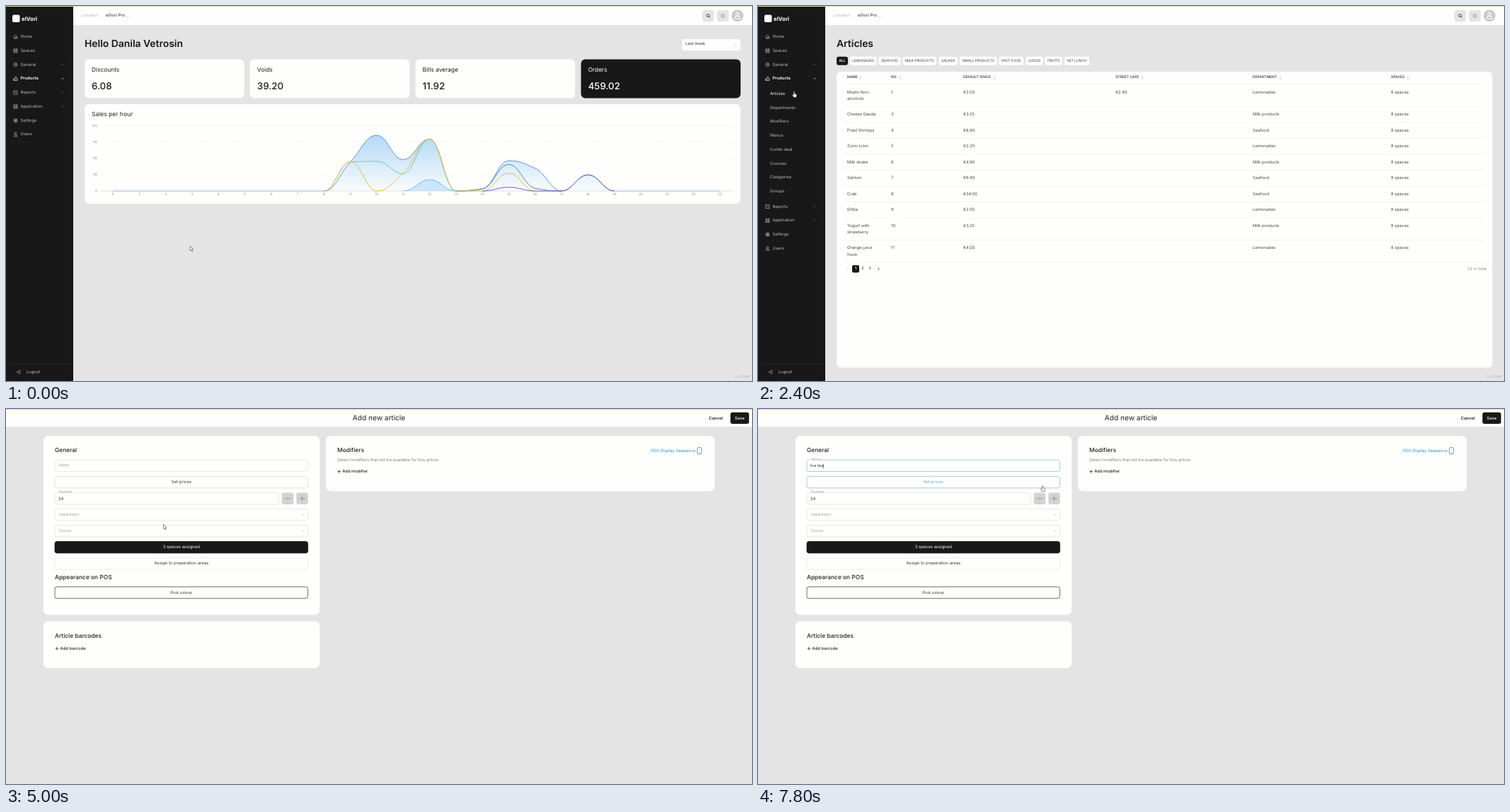
An HTML page that plays this animation: 1054 by 531 pixels, repeating every 8000 ms.

```html
<!DOCTYPE html>
<html lang="en">
<head>
<meta charset="utf-8">
<title>Back office</title>
<style>
  html, body { margin: 0; width: 100%; height: 100%; overflow: hidden; background: #e4e4e4; }
  svg { display: block; }
  #stage { width: 100vw; height: 100vh; }
  text { font-family: Inter, sans-serif; dominant-baseline: central; text-rendering: geometricPrecision; white-space: pre; }
</style>
</head>
<body>
<svg id="stage" viewBox="0 0 1054 531"></svg>
<script>
const INK = '#181818', PAPER = '#fefefd', GREY = '#999', BLUE = '#2f8acb', FOCUS = '#5aaed8';
const LOOP = 8000, STEP = 200;

// Drawing helpers
const text = (x, y, str, size = 5.9, fill = '#333', weight = 400, anchor = 'start') =>
  `<text x="${x}" y="${y}" font-size="${size}" fill="${fill}" font-weight="${weight}" text-anchor="${anchor}">${str}</text>`;
const mid = (x, y, str, size, fill, weight) => text(x, y, str, size, fill, weight, 'middle');
const rect = (x, y, w, h, fill = PAPER, r = 0, stroke = 'none') =>
  `<rect x="${x}" y="${y}" width="${w}" height="${h}" rx="${r}" fill="${fill}" stroke="${stroke}" stroke-width=".8"/>`;
const line = (d, stroke, width = .7, extra = '') =>
  `<path d="${d}" fill="none" stroke="${stroke}" stroke-width="${width}" ${extra}/>`;
const at = (x, y, content) => `<g transform="translate(${x} ${y})">${content}</g>`;
const chevron = (x, y, color, dir = 1) => line(`M${x - 1.6} ${y - .8 * dir}l1.6 ${1.6 * dir} 1.6 ${-1.6 * dir}`, color, .6);
const plus = (x, y, s, color, w = .7) => line(`M${x - s} ${y}h${2 * s}M${x} ${y - s}v${2 * s}`, color, w);
const device = (x, y, color) => rect(x, y, 6, 9, 'none', 1, color) + line(`M${x + 2} ${y + 7.6}h2`, color, .5);
const lens = (x, y, color, w = .7) => line(`M${x + 1.7} ${y - .4}a2 2 0 1 1-4 0a2 2 0 1 1 4 0M${x + 1.1} ${y + 1.1}l1.6 1.6`, color, w);
const person = 'M-1.4-1.6a1.4 1.4 0 1 1 2.8 0a1.4 1.4 0 1 1-2.8 0M-2.3 2.7v-.7q0-1.6 2.3-1.6t2.3 1.6v.7z';

// Sidebar
const gridIcon = 'M-2.6-2.6h2v2h-2zM.6-2.6h2v2h-2zM-2.6.6h2v2h-2zM.6.6h2v2h-2z';
const ring = 'M-2.6 0a2.6 2.6 0 1 1 5.2 0a2.6 2.6 0 1 1-5.2 0M-1 0a1 1 0 1 1 2 0a1 1 0 1 1-2 0';
const menu = [
  ['Home', 'M-2.7 0L0-2.5 2.7 0M-2-.5v3h4v-3M-.5 2.5v-1.6h1v1.6'],
  ['Spaces', 'M-2.7-2.5h2.3v2h-2.3zM.8-2.5h1.9v2h-1.9zM-2.7.6h1.9v2h-1.9zM.4.6h2.3v2H.4z'],
  ['General', ring, 1],
  ['Products', 'M-1.6-1L.6-2.6 2.4-.8v3.4h-4zM-2.8.2v2.4h1.2M-.6.2h2', 1],
  ['Reports', 'M-2.6-2.5h5.2v5h-5.2zM-1.5.3l1-1 1 1 1.2-1', 1],
  ['Application', gridIcon, 1],
  ['Settings', ring + 'M-2-2L2 2M2-2L-2 2'],
  ['Users', person],
];
const submenu = ['Articles', 'Departments', 'Modifiers', 'Menus', 'Combi deal', 'Courses', 'Categories', 'Groups'];

function sidebar(t) {
  const open = Math.min(1, Math.max(0, (t - 1200) / 400)), height = 161.4 * open;
  let out = rect(0, 1, 95, 530, INK) + rect(9, 12.5, 10.5, 10.5, '#fff', 2) + text(22, 18, 'elVori', 7.8, '#fff', 700);
  menu.forEach(([label, icon, expands], i) => {
    const y = 43.5 + 19.78 * i + (i > 3 ? height : 0), active = label === 'Products';
    const color = active ? '#fff' : '#bdbdbd';
    out += at(13.5, y, line(icon, color, .65)) + text(20.5, y, label, 5.9, color, active ? 600 : 400);
    if (expands) out += chevron(80, y - .2, active ? '#fff' : '#777', active && open ? -1 : 1);
  });
  const items = submenu.map((label, i) =>
    text(17, 11.3 + 19.75 * i, label, 5.9, !i && t >= 1800 && t <= 2600 ? '#fff' : '#bdbdbd')).join('');
  if (open) out += `<svg x="0" y="113" width="95" height="${height}">${items}</svg>`;
  return out + line('M5 507h85', '#2b2b2b', .7) + text(28.7, 518.5, 'Logout', 5.8, '#c4c4c4') +
    at(18, 518.5, line('M-.6-2.3h2.6v4.6H-.6M-2.8 0H.6M-1.6-1.2L-2.8 0l1.2 1.2', '#bbb', .6));
}

function topBar() {
  return rect(95, 0, 959, 27) + text(107, 13.7, 'Location:', 5.7, '#b4b4b4') + text(141, 13.7, 'elVori Pro', 5.9, '#222') +
    chevron(171.7, 15.5, '#aaa') +
    rect(984, 5.8, 16.3, 16.3, '#e4e4e4', 3) + lens(992.3, 14, '#222', .8) +
    rect(1004.6, 5.8, 16.3, 16.3, '#e4e4e4', 3) +
    at(1012.8, 14, line('M-2.7 0a2.7 2.7 0 1 1 5.4 0a2.7 2.7 0 1 1-5.4 0M-1.2 0a1.2 2.7 0 1 1 2.4 0a1.2 2.7 0 1 1-2.4 0M-2.7 0h5.4', '#999', .5)) +
    `<circle cx="1033.5" cy="13.9" r="8.4" fill="#c9c9cb"/>` +
    at(1033.5, 13.7, `<g transform="scale(1.6)">${line(person, '#fff', .65)}</g>`) +
    text(1050, 524.7, 'v. 0.3.84', 4.95, '#a5a5a5', 400, 'end');
}

// Dashboard chart: values by hour, every hour not listed is zero
const series = [
  ['#5f93dc', { 9: 54, 10: 103, 11: 58, 12: 96, 14: 4, 15: 56, 16: 42, 18: 30 }],
  ['#5b7fa8', { 14: 4, 15: 49, 16: 5 }],
  ['#62cdbd', { 9: 54, 10: 55, 11: 32, 12: 96 }],
  ['#e6bc3c', { 9: 54, 11: 33, 12: 96, 15: 33 }],
  ['#6c5fc4', { 15: 7, 18: 30 }],
  ['#72bfe8', { 12: 21 }],
];
const hourX = h => 151 + 37.29 * h, valueY = v => 262 - v * 92 / 120;

function curve(values, from, to) {
  const y = h => valueY(values[h] || 0), bend = .42;
  const slope = h => {
    const a = y(h) - y(h - 1), b = y(h + 1) - y(h);
    return a * b <= 0 ? 0 : 2 * a * b / (a + b);
  };
  let d = `M${hourX(from)} ${y(from)}`;
  for (let h = from; h < to; h++)
    d += `C${hourX(h + bend)} ${y(h) + slope(h) * bend} ${hourX(h + 1 - bend)} ${y(h + 1) - slope(h + 1) * bend} ${hourX(h + 1)} ${y(h + 1)}`;
  return d;
}

function chart() {
  let out = `<linearGradient id="area" gradientUnits="userSpaceOnUse" x1="0" y1="183" x2="0" y2="262">
    <stop stop-color="#b4d8f7"/><stop offset="1" stop-color="#b4d8f7" stop-opacity=".06"/></linearGradient>`;
  out += rect(111, 139, 926.5, 141, PAPER, 6) + text(121, 154, 'Sales per hour', 8.5, '#222');
  for (let v = 0; v <= 120; v += 30) {
    out += text(129, valueY(v) - .4, v, 4.8, '#8a8a8a', 400, 'end');
    out += line(`M133 ${valueY(v)}H1027`, v ? '#e9e9e9' : '#cfcfcf', .6, v ? 'stroke-dasharray="3 2"' : '');
  }
  for (let h = 0; h < 24; h++) out += mid(hourX(h), 267.3, h, 4.7, '#8a8a8a');
  out += `<path d="${curve(series[0][1], 8, 19)}z" fill="url(#area)"/>`;
  out += `<path d="${curve(series[5][1], 11, 13)}z" fill="#a5d2f5" opacity=".5"/>`;
  series.forEach(([color, values], i) => {
    const hours = Object.keys(values).map(Number);
    out += line(curve(values, Math.min(...hours) - 1, Math.max(...hours) + 1), color, 1);
  });
  const base = '#9cc3e4';
  return out + line('M151 262H449M860 262H1009', base, 1);
}

function dashboard() {
  const cards = [['Discounts', '6.08'], ['Voids', '39.20'], ['Bills average', '11.92'], ['Orders', '459.02']];
  return text(111, 53.5, 'Hello Danila Vetrosin', 13.9, INK, 600) +
    rect(955, 47, 82.4, 16, PAPER, 2.5) + text(960, 53.6, 'Last week', 5.8, '#333') + chevron(1031, 55, '#aaa') +
    cards.map(([label, value], i) => {
      const x = 111 + 233.8 * i, dark = i === 3, color = dark ? '#fff' : '#1c1c1c';
      return rect(x, 75.5, 225.5, 55, dark ? INK : PAPER, 6) +
        text(x + 10, 90.5, label, 8.4, color) + text(x + 10, 114.3, value, 13.3, color, 500);
    }).join('') + chart();
}

// Article list
const tabs = [['ALL', 111, 127], ['LEMONADES', 130, 167.5], ['SEAFOOD', 170.5, 201.5], ['MILK PRODUCTS', 204.5, 252],
  ['SALADS', 255.5, 282], ['SMALL PRODUCTS', 285, 337.5], ['FAST FOOD', 340.5, 375], ['JUICES', 378.5, 402.5],
  ['FRUITS', 405.5, 430], ['SET LUNCH', 433, 468]];
const headings = [['NAME', 19], ['NO.', 12.7], ['DEFAULT SPACE', 44], ['STREET CAFE', 38], ['DEPARTMENT', 39], ['SPACES', 24]];
const articles = [
  ['Mojito Non-|alcoholic', 1, '3.50', 'Lemonades', '2.90'], ['Cheese Gauda', 3, '3.25', 'Milk products'],
  ['Fried Shrimps', 4, '8.90', 'Seafood'], ['Zuno-Limo', 5, '2.25', 'Lemonades'], ['Milk shake', 6, '4.90', 'Milk products'],
  ['Salmon', 7, '6.40', 'Seafood'], ['Crab', 8, '34.00', 'Seafood'], ['Orbla', 9, '2.50', 'Lemonades'],
  ['Yogurt with|strawberry', 10, '3.25', 'Milk products'], ['Orange juice|fresh', 11, '4.00', 'Lemonades'],
];

function articleList(full) {
  const cols = full ? [126, 188, 282.5, 482, 662, 843] : [126, 188, 290, 505.2, 699, 894.3];
  const top = full ? 96.3 : 93, tabY = full ? 81.2 : 77.8, pitch = full ? 23 : 22.5;
  let out = text(111, 53.5, 'Articles', 13.9, INK, 600);
  tabs.forEach(([label, x, end], i) => {
    out += rect(x, tabY - 6, end - x, 12, i ? PAPER : INK, 3) + mid((x + end) / 2, tabY, label, 4.95, i ? '#333' : '#fff', i ? 400 : 600);
  });
  out += rect(111, top, 926.5, 512 - top, PAPER, 6);
  headings.forEach(([label, width], i) => {
    const x = cols[i] + width, y = top + 8.4;
    out += text(cols[i], y, label, 4.95, '#444', 600) +
      line(`M${x - 1.4} ${y - .8}l1.4-1.4 1.4 1.4M${x - 1.4} ${y + .8}l1.4 1.4 1.4-1.4`, '#999', .6);
  });
  if (full) {
    out += lens(127.3, 130, '#aaa', .6) + text(134.5, 130, 'What are you looking for?', 8.3, '#a3a3a3') +
      text(974, 105, 'POS Display', 5, '#d3d3d3') + text(974, 112.6, 'Sequence', 5, '#d3d3d3') + device(1014.8, 104.5, '#bbb') +
      rect(971, 47, 66, 16, '#e9e9e8', 3, '#666') + plus(980.6, 55, 2.3, '#333') + text(987.5, 55, 'Add new article', 5.9, '#333');
  }
  let y = full ? 150 : 122;
  const rule = ruleY => line(`M120 ${ruleY}H1028`, '#eeeeed', .7);
  articles.forEach(([name, no, price, department, street]) => {
    const lines = name.split('|');
    out += rule(y - 11.2);
    lines.forEach((part, i) => out += text(cols[0], y + 9.3 * i, part, 5.85, '#444'));
    [no, '€' + price, street ? '€' + street : '', department, '8 spaces'].forEach((cell, i) =>
      out += text(cols[i + 1], y, cell, 5.85, '#444'));
    if (full) for (const dy of [-1.8, 0, 1.8]) out += `<circle cx="1019.8" cy="${y + dy}" r=".55" fill="#555"/>`;
    y += lines.length > 1 ? 31.6 : pitch;
  });
  out += rule(y - 11.4);
  const pageY = y - 2;
  return out + line(`M127.5 ${pageY - 1.8}l-1.8 1.8 1.8 1.8`, '#ccc', .6) + rect(133, pageY - 5.2, 10, 10.4, INK, 2) +
    mid(138, pageY, 1, 5.5, '#fff', 600) + mid(148, pageY, 2, 5.5) + mid(158, pageY, 3, 5.5) +
    line(`M169.2 ${pageY - 2}l2 2-2 2`, '#333', .8) + text(1029.5, pageY, '22 in total', 5.8, '#8c8c8c', 400, 'end');
}

// New article form
function field(y, label, { width = 357.5, value, border = '#e2e2e2', select } = {}) {
  const floats = value !== undefined;
  return rect(69, y - 8.2, width, 16.4, PAPER, 3, border) +
    (floats ? rect(73, y - 10, label.length * 3.2 + 3, 3, PAPER) + text(75, y - 8.8, label, 5, GREY) + text(74, y + .3, value, 5.85, '#333')
      : text(75, y, label, 5.05, GREY)) +
    (select ? chevron(420, y + .3, '#aaa') : '');
}
const button = (y, label, border = '#dcdcdc', color = '#333', fill = PAPER) =>
  rect(69, y - 8.2, 357.5, 16.4, fill, 3, border) + mid(247.8, y, label, 5.9, color);
const title = (x, y, str) => text(x, y, str, 8.4, '#222', 500);
const adder = (x, y, str) => plus(x, y - .3, 2.4, '#222') + text(x + 4.6, y, str, 5.85, '#222', 500);

function form(t) {
  const focused = t >= 5400, priceHover = t >= 5800, assigned = t >= 4800;
  const typed = 'Ice tea'.slice(0, Math.max(0, (t - 6200) / STEP));
  const name = focused ? { value: `${typed}<tspan dx="-.8" fill="#111">|</tspan>`, border: '#8dc3de' } : {};
  return rect(0, 0, 1054, 25) + mid(527, 13.2, 'Add new article', 10.1, '#222') +
    mid(1003, 13, 'Cancel', 5.9, '#222', 600) + rect(1023.5, 4.8, 26.3, 16.2, INK, 3) + mid(1036.6, 13, 'Save', 5.9, '#fff', 500) +
    rect(52.8, 38, 390.4, 253.5, PAPER, 7) + rect(52.8, 300.5, 390.4, 66.5, PAPER, 7) + rect(451.8, 38, 549.4, 78.3, PAPER, 7) +
    title(69, 59.3, 'General') + field(80.3, 'Name', name) +
    (priceHover ? button(103.6, 'Set prices', '#8dc3de', FOCUS) : button(103.6, 'Set prices')) +
    field(126.8, 'Number', { value: '24', width: 316.5 }) +
    rect(389.7, 118.4, 16.6, 16.6, '#d3d3d3', 3) + line('M393.8 126.7h8.4', '#777', .7) +
    rect(410.2, 118.4, 16.6, 16.6, '#d3d3d3', 3) + plus(418.5, 126.7, 4.2, '#777') +
    field(149.5, 'Department', { select: true }) + field(172.6, 'Course', { select: true }) +
    (assigned ? button(195.8, '3 spaces assigned', INK, '#fff', INK) : button(195.8, 'Assign to spaces')) +
    button(218.9, 'Assign to preparation areas', '#e8e8e8') +
    title(69, 239, 'Appearance on POS') + button(260, 'Pick colour', '#444') +
    title(69, 322, 'Article barcodes') + adder(72, 339.5, 'Add barcode') +
    title(468, 59.3, 'Modifiers') + text(468, 72.2, 'Select modifiers that will be available for this article', 5.9, '#7c7c7c') +
    adder(470.6, 88.8, 'Add modifier') + text(911, 59.2, 'POS Display Sequence', 5.85, BLUE) + device(976.8, 54.7, BLUE);
}

// Pointer
const pointerPath = [[0, 260, 340], [1200, 50, 100], [1400, 50, 100], [1800, 51, 121], [2600, 51, 121], [3600, 1000, 62],
  [4000, 1000, 62], [4600, 248, 193], [4800, 248, 193], [5400, 150, 79], [6000, 402, 108.5], [LOOP, 402, 108.5]];
const handTimes = [[1000, 2600], [3600, 3800], [4600, 4800], [5800, LOOP]];

function pointer(t) {
  const i = pointerPath.findIndex(([time]) => time > t);
  const [t0, x0, y0] = pointerPath[i - 1], [t1, x1, y1] = pointerPath[i];
  const p = (t - t0) / (t1 - t0), ease = p * p * (3 - 2 * p);
  const hand = handTimes.some(([a, b]) => t >= a && t <= b);
  const shape = hand ? 'M-.8.8q.8-1.4 1.6 0v2.5l2.1.5q.9.3.7 1.5l-.6 2.9h-3.5l-2.3-3.2q.4-1.1 2 .2z'
    : 'M0 0v6.4l1.5-1.4 1.1 2.5 1.1-.5-1.1-2.4h2z';
  return at(x0 + (x1 - x0) * ease, y0 + (y1 - y0) * ease, `<path d="${shape}" fill="#fff" stroke="#444" stroke-width=".6"/>`);
}

function scene(t) {
  const page = t >= 4000 ? form(t) : topBar() + sidebar(t) + (t < 2400 ? dashboard() : articleList(t >= 2600));
  return rect(0, 0, 1054, 531, '#e4e4e4') + page + rect(0, 0, 1054, 1, '#e6d8ab') + pointer(t);
}

const stage = document.getElementById('stage');
let shown = -1;
function tick() {
  const t = Math.floor(performance.now() % LOOP / STEP) * STEP;
  if (t !== shown) stage.innerHTML = scene(shown = t);
  requestAnimationFrame(tick);
}
tick();
</script>
</body>
</html>
```
